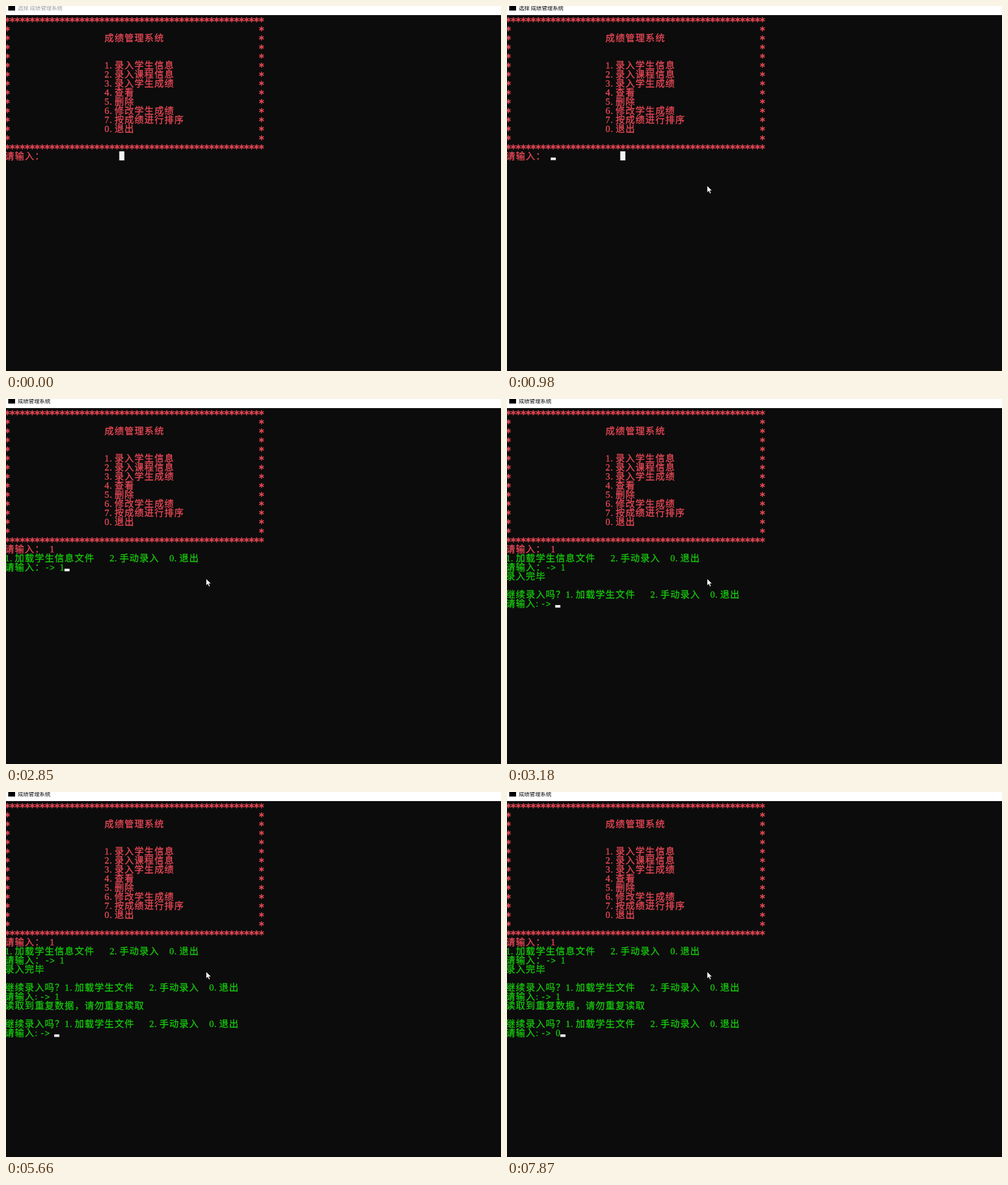
Animation, 872 px wide and 643 px high, one loop 8000 ms. Source, as an HTML page:

```html
<!DOCTYPE html>
<html lang="zh-CN">
<head>
<meta charset="utf-8">
<title>成绩管理系统</title>
<style>
  html, body { margin: 0; width: 100%; height: 100%; overflow: hidden; background: #0c0c0c; }
  svg { display: block; width: 872px; height: 643px; }
  text { font: 16.4px "Liberation Serif", "Noto Sans CJK SC", "Noto Sans CJK", serif; }
  #screen text { stroke-width: .35px; }
  .red { fill: #e74856; stroke: #e74856; }
  .green { fill: #16c60c; stroke: #16c60c; }
  #screen .star { font: bold 17px "DejaVu Sans Mono", monospace; }
  #screen .arrow { font: 14.6px "Liberation Mono", monospace; }
  #title { font: 9.6px "Noto Sans CJK SC", "Noto Sans CJK", sans-serif; }
</style>
</head>
<body>
<svg id="stage" viewBox="0 0 872 643" lang="zh-CN">
  <rect width="872" height="643" fill="#0c0c0c"/>
  <rect width="872" height="16" fill="#fff"/>
  <rect x="4" y="-4" width="12" height="12" fill="#000"/>
  <text id="title" x="20.7" y="7"></text>
  <g id="screen"></g>
  <rect id="selection" x="199.5" y="256" width="9" height="16" fill="#f2f2f2"/>
  <rect id="caret" width="9" height="4.5" fill="#f2f2f2"/>
  <g id="pointer">
    <circle id="halo" cy="-1" r="9.7" fill="#827c0a"/>
    <path d="M.5 0V12.2L3.4 9.6 5.4 14 7.5 13.1 5.6 8.8H9.4Z" fill="#fff" stroke="#000" stroke-width=".7"/>
  </g>
</svg>
<script>
const LOOP = 8000, LEFT = -2, CELL = 8.78, ROW = 16;
const $ = id => document.getElementById(id);
const colX = col => LEFT + col * CELL;
const rowY = row => ROW * (row + 1);
const timed = [];

function addText(cls, content, xs, y, time) {
  const el = document.createElementNS("http://www.w3.org/2000/svg", "text");
  el.setAttribute("class", cls);
  el.setAttribute("x", xs.map(x => x.toFixed(2)).join(" "));
  el.setAttribute("y", y);
  el.textContent = content;
  $("screen").append(el);
  if (time) timed.push({ el, time });
}

// Lays characters on the console grid: wide ones take two cells.
function print(row, col, content, style, time = 0) {
  const xs = [];
  let glyphs = "";
  for (const ch of content) {
    if (ch !== " ") {
      xs.push(colX(col));
      glyphs += ch;
    }
    col += ch > "\u2fff" ? 2 : 1;
  }
  addText(style, glyphs, xs, rowY(row) + 13.7, time);
}

function stars(row, cols) {
  const xs = cols.map(col => colX(col) - 0.7);
  addText("red star", "*".repeat(cols.length), xs, rowY(row) + 16.8);
}

function prompt(row, colon, time, answer, answerTime) {
  const col = colon === "：" ? 8 : 7;
  print(row, 0, "请输入" + colon, "green", time);
  print(row, col, "->", "green arrow", time);
  print(row, col + 3, answer, "green", answerTime);
}

const fullRow = [...Array(52).keys()];
for (let row = 0; row < 15; row++) stars(row, row % 14 ? [0, 51] : fullRow);
print(2, 20, "成绩管理系统", "red");
["1.录入学生信息", "2.录入课程信息", "3.录入学生成绩", "4.查看", "5.删除",
 "6.修改学生成绩", "7.按成绩进行排序", "0.退出"]
  .forEach((item, i) => print(5 + i, 20, item, "red"));

const again = "继续录入吗？1.加载学生文件   2.手动录入  0.退出";
print(15, 0, "请输入：", "red");
print(15, 9, "1", "red", 1530);
print(16, 0, "1.加载学生信息文件   2.手动录入  0.退出", "green", 2390);
prompt(17, "：", 2390, "1", 2850);
print(18, 0, "录入完毕", "green", 3130);
print(20, 0, again, "green", 3180);
prompt(21, ":", 3180, "1", 5330);
print(22, 0, "读取到重复数据，请勿重复读取", "green", 5660);
print(24, 0, again, "green", 5660);
prompt(25, ":", 5660, "0", 7870);

// Time, then row and column; no position means the caret is off.
const caretSteps = [
  [0], [980, 15, 9], [1460], [2060, 15, 10], [2390, 17, 11], [2850, 17, 12],
  [3130], [3180, 21, 10], [4190], [4720, 21, 10], [5200], [5330, 21, 11],
  [5660, 25, 10], [6260], [6790, 25, 10], [7340], [7870, 25, 11]
];

const show = (el, on) => el.setAttribute("visibility", on ? "visible" : "hidden");

function draw(t) {
  for (const { el, time } of timed) show(el, t >= time);

  const selecting = t < 1460;
  $("title").textContent = (selecting ? "选择 " : "") + "成绩管理系统";
  $("title").setAttribute("fill", t < 386 ? "#999" : "#000");
  show($("selection"), selecting);

  const [, row, col] = caretSteps.findLast(step => t >= step[0]);
  show($("caret"), row !== undefined);
  if (row !== undefined) {
    $("caret").setAttribute("x", Math.floor(colX(col)));
    $("caret").setAttribute("y", rowY(row) + 11);
  }

  const step = Math.floor((t - 70) / 63.2);
  const p = Math.min(1, Math.max(0, step / 5));
  const eased = p * p * (3 - 2 * p);
  const x = 757 + (352 - 757) * eased, y = 556 + (316.5 - 556) * eased;
  $("pointer").setAttribute("transform", `translate(${x} ${y})`);
  show($("pointer"), t >= 70);
  show($("halo"), t >= 386 && t < 650);
}

const start = performance.now();
function tick() {
  draw((performance.now() - start) % LOOP);
  requestAnimationFrame(tick);
}
tick();
</script>
</body>
</html>
```
